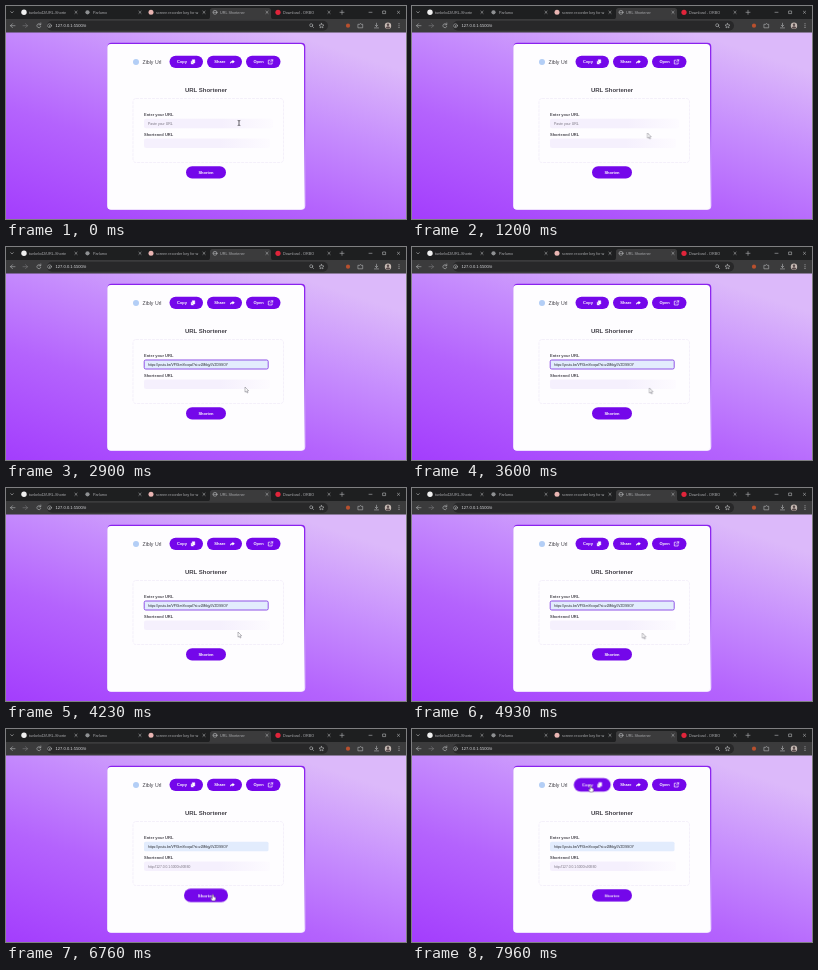
These frames come from a looping animation (400 px wide and 213 px high, 8 s). An HTML page:

```html
<!DOCTYPE html>
<html lang="en">
<head>
<meta charset="utf-8">
<title>URL Shortener</title>
<style>
  html, body { margin: 0; width: 100%; height: 100%; overflow: hidden; background: #b25cff; }
  svg { display: block; width: 100vw; height: 100vh; }
  text { font-family: "Liberation Sans", Arial, sans-serif; }
  .tab { font-size: 3.75px; fill: #adaeb1; }
  .label { font-size: 4px; font-weight: 700; fill: #4a4850; }
  .value { font-size: 3.3px; fill: #24262c; }
  .button { transform-box: fill-box; transform-origin: center; }
  .button rect { fill: #7407ea; }
  .button text { font-size: 4px; font-weight: 700; fill: #fff; }
  .line { fill: none; stroke: #b4b5b8; stroke-width: .6; stroke-linecap: round; stroke-linejoin: round; }
  .glyph { fill: none; stroke: #fff; stroke-width: .65; stroke-linecap: round; stroke-linejoin: round; }

  .cursor { animation: move 8s ease-in-out infinite; }
  .beam, .arrow, .hand, .placeholder, .pasted, .focus, .result { animation: 8s step-end infinite; }
  .beam { animation-name: beam; }
  .arrow { animation-name: arrow; }
  .hand { animation-name: hand; }
  .placeholder { animation-name: placeholder; }
  .pasted { animation-name: pasted; }
  .focus { animation-name: focus; }
  .result { animation-name: result; }
  .shorten { animation: shorten 8s linear infinite; }
  .copy { animation: copy 8s linear infinite; }

  @keyframes move {
    0%, 4% { transform: translate(233px, 117px); }
    12%, 18% { transform: translate(235.5px, 127px); }
    22%, 30% { transform: translate(229px, 117px); }
    35.5%, 42% { transform: translate(239px, 140px); }
    51%, 60% { transform: translate(232px, 144px); }
    69%, 70.5% { transform: translate(207px, 160.3px); }
    74%, 91% { transform: translate(206.8px, 165.7px); }
    99%, 100% { transform: translate(178.6px, 57px); }
  }
  @keyframes beam { 0% { opacity: 1; } 9% { opacity: 0; } 20% { opacity: 1; } 32% { opacity: 0; } }
  @keyframes arrow { 0% { opacity: 0; } 9% { opacity: 1; } 20% { opacity: 0; } 32% { opacity: 1; } 71% { opacity: 0; } 92.5% { opacity: 1; } 97.5% { opacity: 0; } }
  @keyframes hand { 0% { opacity: 0; } 71% { opacity: 1; } 92.5% { opacity: 0; } 97.5% { opacity: 1; } }
  @keyframes placeholder { 0% { opacity: 1; } 27% { opacity: 0; } }
  @keyframes pasted { 0% { opacity: 0; } 27% { opacity: 1; } }
  @keyframes focus { 0% { opacity: 0; } 24% { opacity: 1; } 78% { opacity: 0; } }
  @keyframes result { 0% { opacity: 0; } 80.5% { opacity: 1; } }
  @keyframes shorten { 0%, 71% { transform: none; } 74%, 92% { transform: scale(1.1); } 95%, 100% { transform: none; } }
  @keyframes copy { 0%, 97% { transform: none; } 99.3%, 100% { transform: scale(1.1); } }
</style>
</head>
<body>
<svg viewBox="0 0 400 213" preserveAspectRatio="none">
  <defs>
    <linearGradient id="page" x1="0" y1="1" x2=".7" y2="0">
      <stop stop-color="#a33dfd"/>
      <stop offset=".4" stop-color="#b463fd"/>
      <stop offset=".7" stop-color="#c68dfd"/>
      <stop offset="1" stop-color="#dcb9fa"/>
    </linearGradient>
    <linearGradient id="edge" x2="0" y2="1">
      <stop stop-color="#8a22ee"/>
      <stop offset=".45" stop-color="#a04df4"/>
      <stop offset="1" stop-color="#f2e6ff"/>
    </linearGradient>
    <linearGradient id="field">
      <stop offset=".6" stop-color="#f5f0fd"/>
      <stop offset="1" stop-color="#fdfbff"/>
    </linearGradient>
    <path id="close" class="line" d="M-1.1-1.1 1.1 1.1M1.1-1.1-1.1 1.1"/>
  </defs>

  <rect y="26" width="400" height="187" fill="url(#page)"/>

  <!-- Browser window -->
  <rect width="400" height="14" fill="#1e1f20"/>
  <rect y="13" width="400" height="13.5" fill="#3b3b3c"/>
  <path d="M202 13.2Q204 13 204 11V4.5Q204 2 206.5 2H262.5Q265 2 265 4.5V11Q265 13 267 13.2Z" fill="#3b3b3c"/>
  <rect x="41" y="14.7" width="281" height="10" rx="5" fill="#282829"/>
  <path class="line" d="M4.7 5.6 6 7 7.3 5.6"/>
  <circle cx="18" cy="6.3" r="2.7" fill="#f0f0f0"/>
  <circle cx="81.5" cy="6.3" r="2.1" fill="#8f9193"/>
  <circle cx="145" cy="6.3" r="2.5" fill="#e9b5b2"/>
  <circle class="line" cx="209" cy="6.3" r="2"/>
  <path class="line" d="M207.2 6.3H210.8"/>
  <circle cx="272" cy="6.3" r="2.6" fill="#e0243a"/>
  <g class="tab">
    <text x="23" y="7.7">tunkelo42/URL-Shorte</text>
    <text x="87" y="7.7">Parlumo</text>
    <text x="150" y="7.7">screen recorder key for w</text>
    <text x="214" y="7.7">URL Shortener</text>
    <text x="277" y="7.7">Download - ORBO</text>
  </g>
  <use href="#close" x="70" y="6.3"/>
  <use href="#close" x="134" y="6.3"/>
  <use href="#close" x="198" y="6.3"/>
  <use href="#close" x="261" y="6.3"/>
  <use href="#close" x="323" y="6.3"/>
  <use href="#close" x="392.5" y="6.3"/>
  <path class="line" d="M334 6.3H338M336 4.3V8.3M363 6.3H366M377 5H379.6V7.6H377Z"/>

  <path class="line" d="M9 19.7H4.5M6.5 17.7 4.5 19.7 6.5 21.7"/>
  <path class="line" d="M17 19.7H21.5M19.5 17.7 21.5 19.7 19.5 21.7" opacity=".5"/>
  <path class="line" d="M34.6 18.6A2 2 0 1 0 34.8 20.4M34.8 17V18.8H33"/>
  <circle class="line" cx="43.5" cy="19.7" r="1.9"/>
  <path class="line" d="M43.5 19.5V20.7"/>
  <text x="49.5" y="21.2" font-size="4.1" fill="#dcdde0">127.0.0.1:5500/#</text>
  <circle class="line" cx="305.2" cy="19.2" r="1.5"/>
  <path class="line" d="M306.4 20.4 307.6 21.6"/>
  <path class="line" d="M315.5 17.3 316.2 18.9 318 19 316.7 20.2 317 21.9 315.5 21 314 21.9 314.3 20.2 313 19 314.8 18.9Z"/>
  <circle cx="342" cy="19.7" r="2.1" fill="#b8502e"/>
  <path class="line" d="M352.3 18.3H353.8Q354.5 16.5 355.2 18.3H356.7V21.8H352.3Z"/>
  <path class="line" d="M370.5 17.2V20.3M369.2 19.2 370.5 20.5 371.8 19.2M368.5 21.9H372.5"/>
  <circle cx="382" cy="19.7" r="3.2" fill="#c4b8b2"/>
  <path d="M379.8 22Q380 20.2 382 20.2T384.2 22Q382 23.6 379.8 22Z" fill="#57494a"/>
  <circle cx="382" cy="18.7" r="1.2" fill="#57494a"/>
  <g fill="#c4c5c7"><circle cx="393" cy="17.8" r=".5"/><circle cx="393" cy="19.7" r=".5"/><circle cx="393" cy="21.6" r=".5"/></g>

  <!-- Card -->
  <rect x="101.5" y="36.8" width="197.8" height="167" rx="4" fill="url(#edge)"/>
  <rect x="101.3" y="38" width="196.7" height="165.5" rx="3.5" fill="#fefdff"/>
  <circle cx="130" cy="56" r="3" fill="#b3cef6"/>
  <text x="136.5" y="57.8" font-size="5.2" fill="#44424a">Zibly Url</text>

  <g class="button copy">
    <rect x="163.5" y="49.7" width="33.5" height="12.3" rx="6.15"/>
    <text x="171" y="57.3">Copy</text>
    <path d="M186.2 53.7H188.8V57H186.2ZM185.2 54.8V58H187.8" fill="#fff" stroke="#fff" stroke-width=".4"/>
  </g>
  <g class="button">
    <rect x="201" y="49.7" width="35" height="12.3" rx="6.15"/>
    <text x="208.3" y="57.3">Share</text>
    <path d="M224 57.8Q224 55 226.5 55V53.7L228.8 55.7 226.5 57.6V56.4Q225 56.4 224 57.8Z" fill="#fff"/>
  </g>
  <g class="button">
    <rect x="240" y="49.7" width="34.5" height="12.3" rx="6.15"/>
    <text x="247.5" y="57.3">Open</text>
    <path class="glyph" d="M264 54.2H262.3V58H266.1V56.6M264.3 56.2 266.6 53.9M265.2 53.8H266.7V55.3"/>
  </g>

  <text x="200" y="86.3" text-anchor="middle" font-size="6" font-weight="700" fill="#45434b">URL Shortener</text>
  <rect x="127" y="92.5" width="150.5" height="64" rx="3" fill="none" stroke="#efeaf8" stroke-width=".7" stroke-dasharray="3 1"/>

  <text class="label" x="138" y="109.5">Enter your URL</text>
  <g class="placeholder">
    <rect x="138" y="112.8" width="129" height="9.4" rx="2" fill="url(#field)"/>
    <text x="142" y="118.7" font-size="3.5" fill="#77727f">Paste your URL</text>
  </g>
  <g class="pasted">
    <rect x="138" y="112.8" width="124.5" height="9.4" rx="1.5" fill="#e2ecfd"/>
    <text class="value" x="142" y="118.7">https://youtu.be/VPXkmYoxqwI?si=z2Mtbjy5VZDSSOY</text>
  </g>
  <rect class="focus" x="138.2" y="113" width="124" height="9" rx="1.5" fill="none" stroke="#8a45e4" stroke-width=".9"/>

  <text class="label" x="138" y="129.5">Shortened URL</text>
  <rect x="138" y="132.6" width="126" height="9.4" rx="2" fill="url(#field)"/>
  <text class="value result" x="142" y="138.5" style="fill:#77727f">http://127.0.0.1:5000/s90E60</text>

  <g class="button shorten">
    <rect x="180" y="160.3" width="40" height="12.2" rx="6.1"/>
    <text x="200" y="167.9" text-anchor="middle">Shorten</text>
  </g>

  <!-- Pointer -->
  <g class="cursor">
    <path class="beam" d="M-1.3-2.5Q0-2.5 0-1.8Q0-2.5 1.3-2.5M0-1.8V1.8M-1.3 2.5Q0 2.5 0 1.8Q0 2.5 1.3 2.5" fill="none" stroke="#25232a" stroke-width=".7"/>
    <path class="arrow" d="M0 0V5.2L1.2 4.1 2.1 6 3 5.6 2.1 3.8H3.7Z" fill="#fff" stroke="#77747e" stroke-width=".5"/>
    <path class="hand" d="M-.6 0Q0-.8.6 0V2L2.8 2.6Q3.3 4.5 2.3 6H-.8L-2.2 3.6Q-1.8 2.8-.6 3.7Z" fill="#fff" stroke="#35333b" stroke-width=".4"/>
  </g>
</svg>
</body>
</html>
```
